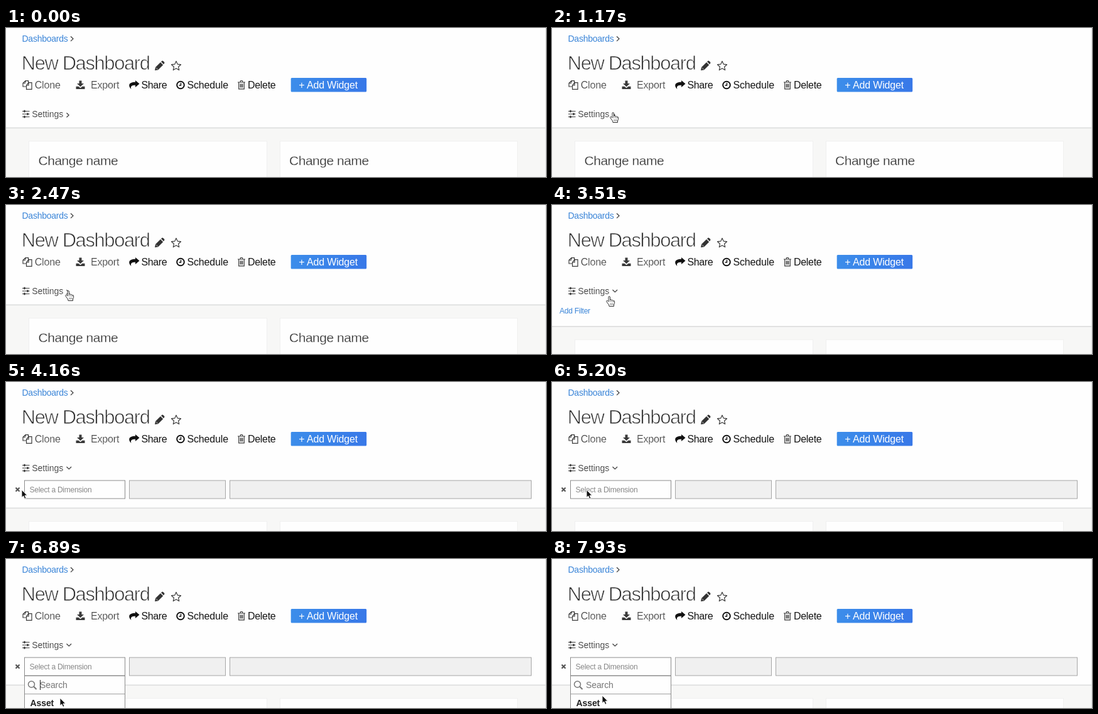
Recreate the animation shown at these times as an HTML page. Size 860 by 239 pixels, loop 8000 ms.

```html
<!DOCTYPE html>
<html lang="en">
<head>
<meta charset="utf-8">
<title>New Dashboard</title>
<style>
  html, body { margin: 0; width: 100%; height: 100%; overflow: hidden; background: #fefefe; }
  svg { display: block; width: 860px; height: 239px; }
  text { font-family: "Liberation Sans", Arial, sans-serif; fill: #333; white-space: pre; }
  .link { fill: #3a85d8; }
  .title { font-size: 31px; letter-spacing: -1.42px; fill: #303030; stroke: #fefefe; stroke-width: .85px; }
  .tool { font-size: 16px; letter-spacing: -.15px; }
  .thin { stroke: #fefefe; stroke-width: .2px; }
  .soft { fill: #444; }
  .dark { fill: #151515; }
  .name { font-size: 21px; letter-spacing: -.47px; stroke: #fefefe; stroke-width: .3px; }
  .small { font-size: 14px; letter-spacing: -.1px; }
  .tiny { font-size: 12px; letter-spacing: -.25px; }
  .hint { fill: #888; }
  .line { fill: none; stroke: #3a3a3a; stroke-width: 1.2; }
  .field { fill: #f0f0f0; stroke: #a6a6a6; }
  .open { fill: #fefefe; stroke: #8c8c8c; }
  .card { fill: #fefefe; stroke: #f0f0f0; }
</style>
</head>
<body>
<svg viewBox="0 0 860 239">
  <defs>
    <linearGradient id="blue">
      <stop offset="0" stop-color="#3c8dea"/>
      <stop offset="1" stop-color="#3878e8"/>
    </linearGradient>
  </defs>
  <rect width="860" height="239" fill="#fefefe"/>

  <!-- widget area, pushed down by the settings panel -->
  <g id="area">
    <rect y="160" width="860" height="90" fill="#f7f7f6"/>
    <rect y="159.5" width="860" height="1.6" fill="#dcdddd"/>
    <rect class="card" x="36.5" y="181.5" width="379" height="80"/>
    <rect class="card" x="436.5" y="181.5" width="378" height="80"/>
    <text class="name" x="51.5" y="220.3">Change name</text>
    <text class="name" x="451" y="220.3">Change name</text>
  </g>
  <rect x="859" width="1" height="239" fill="#e6e6e6"/>

  <text class="small link" x="25.5" y="21.700" style="letter-spacing:-.25px">Dashboards</text>
  <path class="line" d="M103 13.500l4 3.800-4 3.800"/>
  <text class="title" x="24.700" y="67">New Dashboard</text>

  <!-- pencil and star -->
  <path fill="#333" d="M237 68l1-5 8-8 4.200 4.200-8 8zM247 54l1.300-1.200q1-.7 2 .2l1.800 1.800q.8 1 0 2L251 58.200z"/>
  <path d="M239 63.700l2.700 2.700" stroke="#fefefe" stroke-width=".8"/>
  <path class="line" stroke-linejoin="round" d="M271 53.200l2.200 4.900 5.300.6-3.900 3.600 1.100 5.200-4.700-2.700-4.700 2.700 1.100-5.200-3.900-3.600 5.300-.6z"/>

  <!-- toolbar -->
  <g class="line">
    <path d="M31 87.500V84.600H35.500V94H27V88.500L31 84.600M31 88.500H27"/>
    <path d="M36 87.600H41V98.400H32.500V92L36 87.600V92H32.500" fill="#fefefe"/>
  </g>
  <text class="tool thin soft" x="45.700" y="97">Clone</text>

  <path fill="#3a3a3a" d="M116.500 84.500h4v4.500h3.500l-5.500 5.200-5.500-5.200h3.500zM111.500 93.700h4l3 2.600 3-2.600h4v4.300h-14z"/>
  <text class="tool thin soft" x="135" y="97">Export</text>

  <path fill="#111" d="M206 84l6.500 5.500-6.500 5.500v-3.200c-4-.2-6.500.8-7 3q-.2 1.600.4 3.200c-2-1.600-3.400-4-3.200-6.200.4-3.400 4-5 9.800-5z"/>
  <text class="tool dark" x="215.500" y="97" style="letter-spacing:-.4px">Share</text>

  <circle class="line" cx="278" cy="91.500" r="5.800" style="stroke:#111;stroke-width:2"/>
  <path class="line" d="M278.500 88v4h-3" style="stroke:#111;stroke-width:1.400"/>
  <text class="tool dark" x="288.500" y="97">Schedule</text>

  <path class="line" d="M369 87h12M373 86.500l.8-2h2.400l.8 2M370.700 87.500v10.300h8.600V87.500M373.200 89.500v6M375 89.500v6M376.800 89.500v6"/>
  <text class="tool dark" x="385" y="97" style="letter-spacing:-.3px">Delete</text>

  <rect x="453.700" y="80" width="120.500" height="22.500" rx="1.500" fill="url(#blue)"/>
  <text class="tool" x="466.300" y="97" style="fill:#fff">+ Add Widget</text>

  <!-- settings heading -->
  <path class="line" d="M26 133.500h11.500M26 138h11.500M26 142.500h11.500"/>
  <path d="M29.500 131.700v3.600M34.500 136.200v3.600M29.500 140.700v3.600" stroke="#333" stroke-width="2.200"/>
  <text class="small thin" x="41.300" y="142.500">Settings</text>
  <path id="closed" class="line" d="M96.500 136.200l3.600 3.500-3.600 3.500"/>
  <path id="opened" class="line" d="M96.500 136l3.800 3.600 3.800-3.600"/>

  <text id="add" class="tiny link" x="12" y="173.500">Add Filter</text>

  <g id="row">
    <path d="M15.500 169.500l6 6M21.500 169.500l-6 6" stroke="#555" stroke-width="2.200"/>
    <rect class="open" x="29.500" y="158" width="160" height="29"/>
    <rect class="field" x="196.500" y="158" width="153" height="29"/>
    <rect class="field" x="356.500" y="158" width="480" height="29"/>
    <text class="tiny hint" x="37.500" y="176.500">Select a Dimension</text>
  </g>

  <g id="menu">
    <rect class="open" x="29.500" y="187.500" width="160" height="70"/>
    <path d="M30 216.500h159" stroke="#a0a0a0"/>
    <g fill="none" stroke="#777">
      <circle cx="40.500" cy="201" r="5" stroke-width="1.500"/>
      <path d="M44.300 204.800l4.200 4.200" stroke-width="2"/>
    </g>
    <text class="small" x="54" y="207" style="fill:#777">Search</text>
    <path id="caret" d="M54.500 194v16" stroke="#222"/>
    <text class="small" x="38.500" y="236" style="fill:#222;font-weight:bold">Asset</text>
  </g>

  <g id="hand">
    <path fill="#fff" stroke="#333" stroke-linejoin="round" d="M5 16.500L4.500 14 1.500 10Q0 8 1.300 7.300 2.500 7 4 9V2Q4 .5 5.200.5T6.500 2V6.500Q7 5.500 8 5.700 9 6 9.200 7 10.800 5.800 11.600 7.600 13.600 7 13.600 9V11.500L12.500 14V16.500Z"/>
    <path fill="none" stroke="#555" stroke-width=".8" d="M6.500 6v3.500M9.200 7v2.800M11.600 7.600v2.400M7 11.500v3M9 11.500v3M11 11.500v3"/>
  </g>
  <path id="arrow" fill="#111" stroke="#fff" stroke-width=".9" d="M0 0V12.300L2.800 9.800 4.800 14.300 7 13.300 5 9H8.800Z"/>
</svg>
<script>
  const LOOP = 8000;
  const OPEN = 2730, ROW = 4160, MENU = 5460;
  const caretFlips = [5590, 6240, 6760, 7410];

  // time, pointer, x, y
  const moves = [
    [780, "arrow", 122, 204], [910, "arrow", 110, 172],
    [1040, "hand", 94, 140], [1170, "hand", 92, 135],
    [1690, "hand", 93, 136], [2210, "hand", 94, 137],
    [3120, "hand", 94, 140], [3380, "hand", 92, 142],
    [3510, "hand", 86, 146], [3640, "hand", 62, 158],
    [3770, "hand", 34, 171], [3900, "hand", 21, 172],
    [4160, "arrow", 25, 173], [5200, "arrow", 55, 173],
    [5590, "arrow", 66, 173], [5720, "arrow", 82, 171],
    [5850, "arrow", 88, 170], [6240, "arrow", 89, 190],
    [6370, "arrow", 90, 214], [6630, "arrow", 89, 219],
    [6890, "arrow", 86, 223], [7150, "arrow", 83, 225],
    [7410, "arrow", 81, 224], [7670, "arrow", 80, 221],
    [7930, "arrow", 80, 219]
  ];

  const el = id => document.getElementById(id);
  const show = (id, on) => el(id).style.display = on ? "" : "none";

  function draw(t) {
    const shift = t < OPEN ? 0 : t < ROW ? 34.5 : 42;
    el("area").setAttribute("transform", `translate(0 ${shift})`);
    show("closed", t < OPEN);
    show("opened", t >= OPEN);
    show("add", t >= OPEN && t < ROW);
    show("row", t >= ROW);
    show("menu", t >= MENU);
    show("caret", caretFlips.filter(f => f <= t).length % 2);

    const [, kind, x, y] = moves.filter(m => m[0] <= t).pop() || [];
    for (const id of ["hand", "arrow"]) show(id, id === kind);
    if (kind) el(kind).setAttribute("transform", `translate(${x} ${y})`);
  }

  const start = performance.now();
  function tick() {
    draw((performance.now() - start) % LOOP);
    requestAnimationFrame(tick);
  }
  tick();
</script>
</body>
</html>
```
